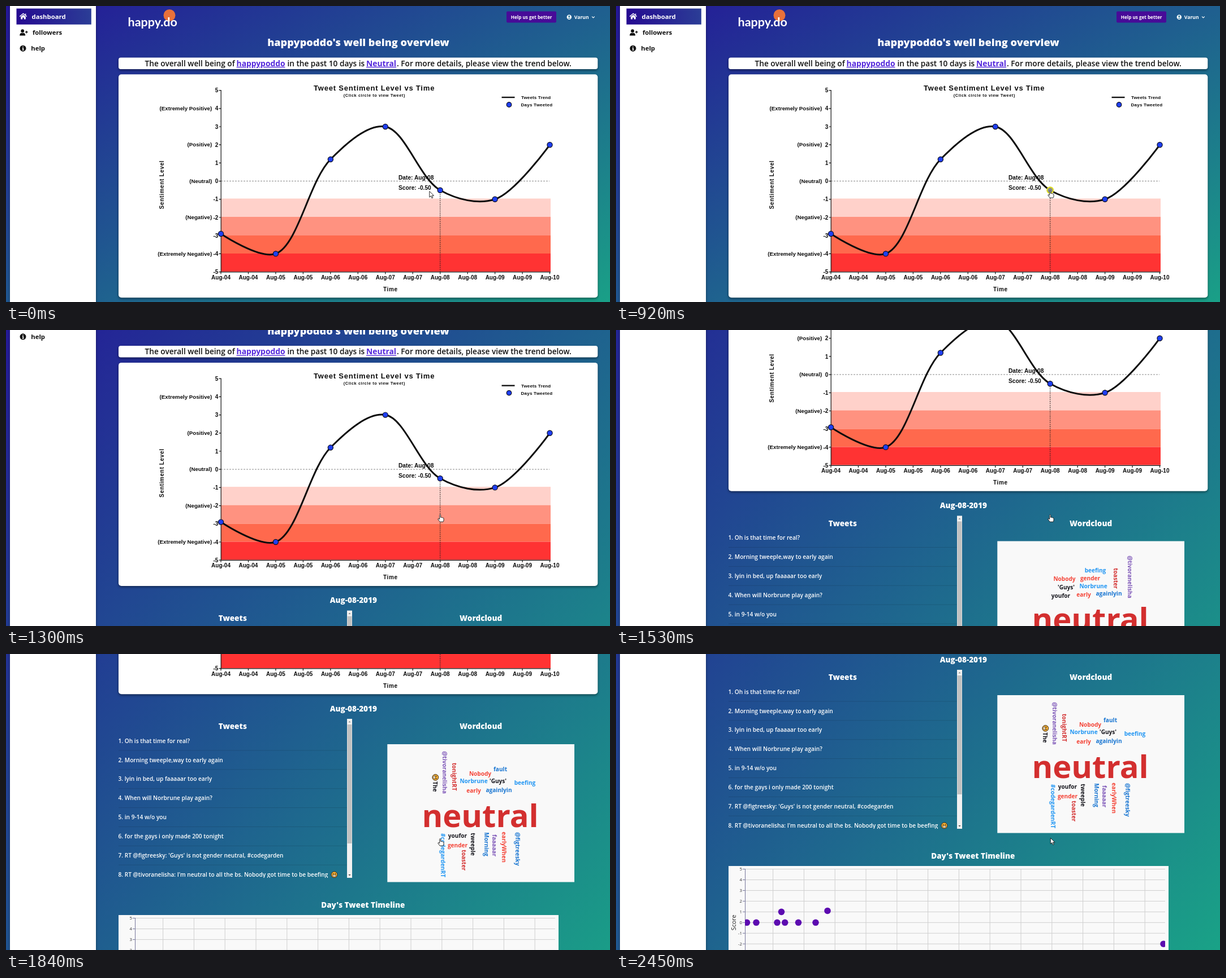
Recreate the animation shown at these times as an HTML page. Size 1068 by 525 pixels, loop 2990 ms.

```html
<!DOCTYPE html>
<html lang="en">
<head>
<meta charset="utf-8">
<title>Well being overview</title>
<style>
html, body { margin: 0; width: 100%; height: 100%; overflow: hidden; }
#stage { position: relative; width: 1068px; height: 525px; overflow: hidden; }
#page { position: absolute; left: 0; top: 0; width: 1068px;
  background: linear-gradient(to bottom right, rgb(37,22,152), rgb(25,168,134)); }
#side { position: absolute; left: 7px; top: -10px; width: 152px; height: 545px;
  background: #fff; box-shadow: 0 0 4px rgba(0,0,0,.45); }
svg { position: absolute; left: 0; top: 0; overflow: visible; }
text { font-family: "Open Sans", "Noto Sans", sans-serif; white-space: pre; }
#plot text { font-family: "Liberation Sans", Arial, sans-serif; font-weight: 700; fill: #0c0c0c; }
.card { fill: #fff; filter: drop-shadow(0 2px 2px rgba(0,0,0,.45)); }
.nav { font-size: 11.3px; font-weight: 700; fill: #111; }
.head { font-weight: 800; fill: #fff; text-anchor: middle; }
.sum { font-size: 13.65px; font-weight: 600; fill: #111; }
.link { font-size: 13.84px; font-weight: 700; fill: #5428dc; text-decoration: underline; }
.post { font-size: 10.15px; font-weight: 600; fill: #fff; }
.word { font-weight: 700; text-anchor: middle; }
</style>
</head>
<body>
<div id="stage">
  <div id="page"></div>
  <div id="side"></div>
  <svg id="art" width="1068" height="1150">
    <defs>
      <linearGradient id="active"><stop stop-color="#250a91"/><stop offset="1" stop-color="#2b3d96"/></linearGradient>
      <clipPath id="list"><rect x="190" y="561" width="422" height="282"/></clipPath>
      <clipPath id="area"><rect x="228" y="905" width="743" height="240"/></clipPath>
      <g id="smile">
        <circle r="5.4" fill="#f9b233" stroke="#3a2a18" stroke-width="1"/>
        <path d="M-3-2.4l2 1-2 1M3-2.4l-2 1 2 1" fill="none" stroke="#3a2a18" stroke-width=".9"/>
        <path d="M-3 .8H3A3 3 0 0 1-3 .8z" fill="#fff" stroke="#3a2a18" stroke-width=".7"/>
      </g>
    </defs>
    <g id="nav"></g>
    <g id="top"></g>
    <g id="plot"></g>
    <g id="day"></g>
    <g id="cloud"></g>
    <g id="timeline"></g>
  </svg>
  <svg width="1068" height="525">
    <path id="arrow" d="M0 0V10.6L2.5 8.3 4.2 12.2 6 11.4 4.3 7.7H7.8z" fill="#fff" stroke="#111" stroke-width=".9"/>
    <path id="hand" d="M-1.3.6C-1.3-.6.6-.6.6.6V4.6Q2.2 3.8 2.6 5 4 4.3 4.4 5.5 6 5 6 6.8V9.2Q6 11 5 12.4H-.8L-3.8 8.4Q-4.6 6.9-3.2 6.7-2.2 6.8-1.3 8z" fill="#fff" stroke="#111" stroke-width=".9"/>
  </svg>
</div>
<script>
const LOOP = 2990;
const $ = id => document.getElementById(id);

function add(parent, tag, attrs, content) {
  const el = document.createElementNS('http://www.w3.org/2000/svg', tag);
  for (const k in attrs) el.setAttribute(k, attrs[k]);
  if (content !== undefined) el.textContent = content;
  (typeof parent === 'string' ? $(parent) : parent).appendChild(el);
  return el;
}
const text = (parent, s, x, y, attrs) => add(parent, 'text', { x, y, ...attrs }, s);
const rect = (parent, x, y, width, height, attrs) => add(parent, 'rect', { x, y, width, height, ...attrs });
const path = (parent, d, attrs) => add(parent, 'path', { d, fill: 'none', ...attrs });
const dot = (parent, cx, cy, r, attrs) => add(parent, 'circle', { cx, cy, r, ...attrs });

function buildNav() {
  rect('nav', 18.5, 4.5, 132.3, 28.3, { fill: 'url(#active)' });
  text('nav', 'dashboard', 45.5, 22.5, { class: 'nav', style: 'fill:#fff' });
  text('nav', 'followers', 47, 50.8, { class: 'nav' });
  text('nav', 'help', 44.3, 79, { class: 'nav' });
  path('nav', 'M24.3 18.6L30.5 13.3 36.7 18.6M34.6 13.6V16', { stroke: '#fff', 'stroke-width': 1.4 });
  path('nav', 'M26.2 19L30.5 15.4 34.8 19V23.6H31.8V20.4H29.2V23.6H26.2z', { style: 'fill:#fff' });
  dot('nav', 29.2, 44.2, 2.9, { fill: '#111' });
  path('nav', 'M24.2 52.5Q24.2 47.8 28 47.8H30.4Q34.2 47.8 34.2 52.5z', { style: 'fill:#111' });
  path('nav', 'M34 46.2H38.6M36.3 43.9V48.5', { stroke: '#111', 'stroke-width': 1.4 });
  dot('nav', 30, 75.2, 5.5, { fill: '#111' });
  path('nav', 'M30 71.4V73M28.8 74.7H30.3V78M28.6 78.1H31.6', { stroke: '#fff', 'stroke-width': 1.4 });
}

function buildTop() {
  dot('top', 289, 16.5, 10.5, { fill: '#e8703a' });
  text('top', 'happy.do', 215.5, 35.5, { fill: '#fff', style: 'font:700 21.5px Lato,sans-serif' });
  rect('top', 885, 9.5, 88, 20, { rx: 2, fill: '#470b98' });
  text('top', 'Help us get better', 892.7, 22.6, { fill: '#fff', 'font-size': 8.15, 'font-weight': 700 });
  dot('top', 995.8, 19.7, 4.2, { fill: '#fff' });
  dot('top', 995.8, 18.3, 1.5, { fill: '#1f6f92' });
  path('top', 'M993.2 22.2Q995.8 19.2 998.4 22.2', { style: 'fill:#1f6f92' });
  text('top', 'Varun', 1004.8, 22.8, { fill: '#fff', 'font-size': 8.6, 'font-weight': 700 });
  path('top', 'M1036 18.6L1038.4 21 1040.8 18.6', { stroke: '#fff', 'stroke-width': 1.2 });
  text('top', "happypoddo's well being overview", 623, 71.4, { class: 'head', 'font-size': 18.15 });
  rect('top', 199, 91.5, 847.3, 20.5, { rx: 4, class: 'card' });
  text('top', 'The overall well being of', 245.6, 106.8, { class: 'sum' });
  text('top', 'happypoddo', 407.6, 106.8, { class: 'link' });
  text('top', 'in the past 10 days is', 497.4, 106.8, { class: 'sum' });
  text('top', 'Neutral', 637, 106.8, { class: 'link' });
  text('top', '. For more details, please view the trend below.', 691, 106.8, { class: 'sum' });
}

const px = day => 380 + 96.92 * day;
const py = v => 310.6 - 32.2 * v;
const scores = [-2.9, -4, 1.2, 3, -0.5, -1, 2];
const pts = scores.map((v, i) => [px(i), py(v)]);

// Centripetal Catmull-Rom spline as cubic segments.
function spline(p) {
  const len = (a, b) => Math.sqrt(Math.hypot(a[0] - b[0], a[1] - b[1]));
  const ctrl = (from, at, other) => {
    if (!other) return at;
    const a = len(from, at), b = len(at, other), n = 3 * b * (a + b);
    return at.map((c, k) => (c * (2 * b * b + 3 * a * b + a * a) + from[k] * b * b - other[k] * a * a) / n);
  };
  let d = 'M' + p[0];
  for (let i = 0; i + 1 < p.length; i++) {
    const c1 = ctrl(p[i + 1], p[i], p[i - 1]), c2 = ctrl(p[i], p[i + 1], p[i + 2]);
    d += 'C' + [c1, c2, p[i + 1]].join(' ');
  }
  return d;
}

function buildPlot() {
  const g = 'plot';
  rect(g, 199, 121.3, 847.3, 396, { rx: 5, class: 'card' });
  [[341.5, 32.5, '#ffd1ca'], [374, 33, '#ff9280'], [407, 32, '#ff694d'], [439, 32, '#ff3333']]
    .forEach(([y, h, fill]) => rect(g, 380, y, 583, h, { fill }));
  path(g, 'M380 310.5H961', { stroke: '#888', 'stroke-width': 1, 'stroke-dasharray': '3 2' });
  path(g, 'M767.6 327V471', { stroke: '#222', 'stroke-width': 1.2, 'stroke-dasharray': '1.6 1.8' });

  let axes = 'M380.2 149V472M380 471.8H963';
  for (let v = -5; v <= 5; v++) {
    axes += `M376.5 ${py(v)}H380`;
    text(g, v, 375.3, py(v) + 3.6, { 'font-size': 10, 'text-anchor': 'end' });
  }
  for (let i = 0; i <= 12; i++) {
    axes += `M${px(i / 2)} 472V475.5`;
    const day = String(4 + Math.floor(i / 2)).padStart(2, '0');
    text(g, 'Aug-' + day, px(i / 2), 484.6, { 'font-size': 10, 'text-anchor': 'middle' });
  }
  path(g, axes, { stroke: '#111', 'stroke-width': 1.2 });
  [[4, 'Extremely Positive'], [2, 'Positive'], [0, 'Neutral'], [-2, 'Negative'], [-4, 'Extremely Negative']]
    .forEach(([v, s]) => text(g, `(${s})`, 364.2, py(v) + 3.2, { 'font-size': 9.7, 'text-anchor': 'end' }));

  text(g, 'Tweet Sentiment Level vs Time', 544, 149.6, { 'font-size': 13, 'letter-spacing': .8 });
  text(g, '(Click circle to view Tweet)', 596.8, 160.8, { 'font-size': 7.3, 'letter-spacing': .6 });
  text(g, 'Time', 667, 505.8, { 'font-size': 10, 'letter-spacing': .6 });
  text(g, 'Sentiment Level', 0, 0, { 'font-size': 10, 'letter-spacing': .66, transform: 'translate(278.6 360.3) rotate(-90)' });
  path(g, 'M876.5 162H899.5', { stroke: '#111', 'stroke-width': 2.4 });
  text(g, 'Tweets Trend', 911, 165, { 'font-size': 8, 'letter-spacing': .15 });
  text(g, 'Days Tweeted', 910.5, 178, { 'font-size': 8, 'letter-spacing': .25 });

  path(g, spline(pts), { stroke: '#0c0c0c', 'stroke-width': 3 });
  text(g, 'Date: Aug-08', 694, 307.5, { 'font-size': 10.2 });
  text(g, 'Score: -0.50', 694, 325.6, { 'font-size': 10.2 });
  const blue = { fill: '#1f3ff2', stroke: '#0c0c1c', 'stroke-width': 1.2 };
  dot(g, 889.5, 175, 4.3, blue);
  return pts.map(([x, y]) => dot(g, x, y, 4.6, blue))[4];
}

function buildDay() {
  text('day', 'Aug-08-2019', 614.3, 547.6, { class: 'head', 'font-size': 13.5 });
  text('day', 'Tweets', 400.8, 579.4, { class: 'head', 'font-size': 13.5 });
  text('day', 'Wordcloud', 839.6, 579.4, { class: 'head', 'font-size': 13.5 });
  const list = add('day', 'g', { 'clip-path': 'url(#list)' });
  ['Oh is that time for real?', 'Morning tweeple,way to early again', 'lyin in bed, up faaaaar too early',
    'When will Norbrune play again?', 'in 9-14 w/o you', 'for the gays i only made 200 tonight',
    "RT @figtreesky: 'Guys' is not gender neutral, #codegarden",
    "RT @tivoranelisha: I'm neutral to all the bs. Nobody got time to be beefing"
  ].forEach((s, i) => {
    const y = 600 + 33.86 * i;
    text(list, `${i + 1}. ${s}`, 198.6, y + 3.7, { class: 'post' });
    path(list, `M199 ${y + 17}H603`, { stroke: '#000', 'stroke-opacity': .13 });
  });
  add(list, 'use', { href: '#smile', x: 580.5, y: 837.3 });
  rect('day', 603, 561, 9, 282, { fill: '#f1f1f1' });
  rect('day', 603.6, 571, 7.8, 211, { fill: '#c1c1c1' });
  path('day', 'M605.4 567.3L607.5 565 609.6 567.3z', { style: 'fill:#888' });
  path('day', 'M605.4 837L607.5 839.3 609.6 837z', { style: 'fill:#444' });
}

const RED = '#f44336', DEEP = '#d32f2f', SKY = '#2196f3', BLUE = '#1976d2', INK = '#15151c', VIOLET = '#7e57b8';
// text, colour, turned, settled x y, early x y (when it has a place there)
const words = [
  ['neutral', DEEP, 0, 838.5, 733.5, 838.5, 744.5],
  ['fault', BLUE, 0, 874, 650],
  ['Nobody', RED, 0, 838.5, 658, 793, 672.5],
  ['Norbrune', SKY, 0, 827, 671.5, 844, 685.5],
  ["'Guys'", INK, 0, 870, 671.7, 796, 687.5],
  ['beefing', SKY, 0, 917.5, 674.7, 847.5, 657.7],
  ['early', RED, 0, 827, 688.5, 827, 700.5],
  ['againlyin', BLUE, 0, 871.5, 687.7, 871.5, 699.2],
  ['@tivoranelisha', VIOLET, 1, 776, 656, 908.5, 669.5],
  ['tonightRT', DEEP, 1, 793, 663.7],
  ['The', INK, 1, 759, 681.3],
  ['#codegardenRT', SKY, 1, 773, 803, 773, 814],
  ['youfor', INK, 0, 798.5, 768.5, 786.5, 702.5],
  ['gender', RED, 0, 798.5, 785, 838.5, 671.5],
  ['toaster', DEEP, 1, 810, 811.7, 883.5, 672],
  ['tweeple', INK, 1, 826, 783.5, 826, 794.5],
  ['Morning', BLUE, 1, 850, 783.5, 850, 794.5],
  ['faaaaar', VIOLET, 1, 864, 785.5, 864, 796.5],
  ['earlyWhen', RED, 1, 881, 788.6, 881, 799.6],
  ['@figtreesky', BLUE, 1, 905, 791.7, 905, 802.7]
];

function buildCloud() {
  rect('cloud', 674.3, 606, 330.7, 244.5, { fill: '#f9f9f9' });
  const early = add('cloud', 'g', {}), settled = add('cloud', 'g', {});
  for (const [s, fill, turned, x, y, ex, ey] of words) {
    const size = s === 'neutral' ? 56 : 10.1;
    const put = (g, cx, cy) => text(g, s, 0, size * .355, {
      class: 'word', fill, 'font-size': size,
      transform: `translate(${cx} ${cy})` + (turned ? 'rotate(90)' : '')
    });
    put(settled, x, y);
    if (ex) put(early, ex, ey);
  }
  add(settled, 'use', { href: '#smile', transform: 'translate(759.3 664.8) rotate(90)' });
  return [early, settled];
}

function buildTimeline() {
  const g = 'timeline', y = v => 1009.3 - 18.95 * v;
  text(g, "Day's Tweet Timeline", 631.3, 895.5, { class: 'head', 'font-size': 13.5 });
  rect(g, 199, 909, 778, 235, { fill: '#f9f9f9' });
  let grid = '', ticks = 'M228.5 914V1144';
  for (let v = -5; v <= 5; v++) {
    grid += `M228 ${y(v)}H971`;
    ticks += `M224 ${y(v)}H228`;
    text(g, v, 222.8, y(v) + 2.8, { 'font-size': 7.7, 'text-anchor': 'end', fill: '#333' });
  }
  for (let i = 0; i < 13; i++) grid += `M${277.6 + 54.8 * i} 914V1144`;
  path(g, grid, { stroke: '#cfcfcf', 'stroke-width': 1 });
  path(g, ticks, { stroke: '#77779c', 'stroke-width': 1 });
  text(g, 'Score', 0, 0, { 'font-size': 10.8, fill: '#222', transform: 'translate(211.6 1023.3) rotate(-90)' });
  const clip = add(g, 'g', { 'clip-path': 'url(#area)' });
  const dots = add(clip, 'g', { fill: '#5c0bb0' });
  [[231.5, 0], [248, 0], [285, 0], [292.5, 1], [298.7, 0], [322.5, 0], [353, 0], [374, 1.1], [968, -2]]
    .forEach(([x, v]) => dot(dots, x, y(v), 5.8));
  return dots;
}

buildNav();
buildTop();
const hot = buildPlot();
buildDay();
const [early, settled] = buildCloud();
const marks = buildTimeline();

// time, scroll offset
const scrolls = [[0, 0], [1070, .5], [1150, 8], [1230, 31], [1300, 63.4], [1380, 113], [1450, 165], [1530, 231.5],
  [1610, 283], [1690, 340], [1760, 391], [1840, 446], [1920, 489], [2010, 520], [2070, 531.5], [2150, 533],
  [2220, 533], [2300, 533], [2380, 533], [2450, 533]];
// time, pointer, x, y
const pointers = [[0, 'arrow', 748.8, 328.6], [230, 'arrow', 752, 328.6], [300, 'arrow', 755.5, 328.3],
  [380, 'arrow', 759, 327.8], [610, 'arrow', 764, 327.2], [690, 'hand', 768, 327.8], [2220, 'arrow', 768.3, 326.3]];
const at = (table, t) => table.findLast(row => row[0] <= t);

function draw(t) {
  const [step, y] = at(scrolls, t);
  const [, kind, x, top] = at(pointers, t);
  $('page').style.height = (t < 1070 ? 590 : 1150) + 'px';
  $('page').style.transform = $('art').style.transform = `translateY(${-y}px)`;
  for (const id of ['arrow', 'hand']) {
    $(id).style.display = id === kind ? '' : 'none';
    $(id).setAttribute('transform', `translate(${x} ${top})`);
  }
  const lit = t >= 920 && t < 1230;
  hot.setAttribute('fill', lit ? '#858a92' : '#1f3ff2');
  hot.setAttribute('stroke', lit ? '#dfdc22' : '#0c0c1c');
  hot.setAttribute('stroke-width', lit ? 2.2 : 1.2);
  hot.setAttribute('r', lit ? 5.4 : 4.6);
  early.style.display = t < 1690 ? '' : 'none';
  settled.style.display = t < 1690 ? 'none' : '';
  marks.setAttribute('opacity', Math.min(1, Math.max(0, (step - 1740) / 710)));
}

const start = performance.now();
function tick() {
  draw((performance.now() - start) % LOOP);
  requestAnimationFrame(tick);
}
tick();
</script>
</body>
</html>
```
